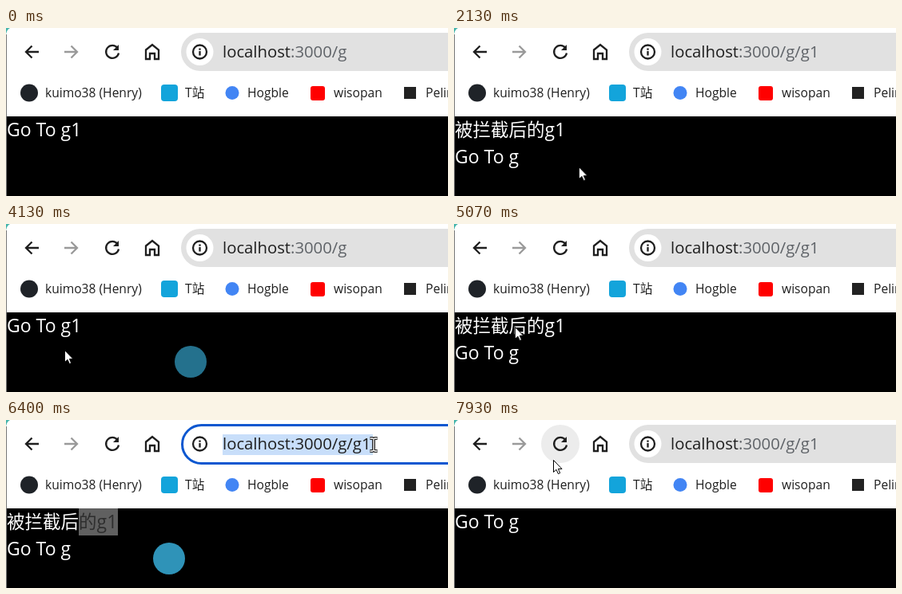
Animation of 553 by 211 pixels, one loop 8 s. Source, as an HTML page:

```html
<!DOCTYPE html>
<html lang="zh">
<head>
<meta charset="utf-8">
<title>Route interception</title>
<style>
html, body { margin: 0; width: 100%; height: 100%; overflow: hidden; background: #fff; }
svg { display: block; width: 553px; height: 211px; }
text { font-family: "Open Sans", "Noto Sans CJK SC", "Noto Sans CJK", sans-serif; white-space: pre; }
.url { font-size: 20.3px; fill: #1f1f1f; }
.marks { font-size: 15.6px; fill: #1f1f1f; }
.page { font-size: 23px; fill: #fff; }
.cjk { font-size: 22.5px; }
.icon { fill: none; stroke: #1f1f1f; stroke-width: 2.3; }

/* hard changes */
.list, .detail, .bare, .sub, .tail, .focus, .rest, .hover, .arrow, .beam, .picked, .sel {
  animation: 8s step-end infinite;
}
.list { animation-name: list; }
.detail { animation-name: detail; }
.bare { animation-name: bare; }
.sub { animation-name: sub, tail; }
.tail { animation-name: tail; }
.focus { animation-name: focus; }
.rest { animation-name: rest; }
.hover { animation-name: hover; }
.arrow { animation-name: arrow; }
.beam { animation-name: beam; }
.picked { animation-name: picked; }
.sel { animation-name: sel, drag; animation-timing-function: step-end, linear;
  transform-box: fill-box; transform-origin: 0 0; }

@keyframes list { 0%, 50.9% { visibility: visible } 18.3%, 62.5%, 100% { visibility: hidden } }
@keyframes detail { 0%, 50.9%, 94.1%, 100% { visibility: hidden } 18.3%, 62.5% { visibility: visible } }
@keyframes bare { 0% { visibility: hidden } 94.1%, 100% { visibility: visible } }
@keyframes sub { 0%, 50.9% { visibility: hidden } 18.3%, 62.5%, 100% { visibility: visible } }
@keyframes tail { 0%, 92.5%, 100% { fill: #5f6368 } 79.1% { fill: #1f1f1f } }
@keyframes focus { 0%, 92.5%, 100% { visibility: hidden } 79.1% { visibility: visible } }
@keyframes rest { 0%, 92.5%, 100% { visibility: visible } 79.1% { visibility: hidden } }
@keyframes hover { 0% { visibility: hidden } 92.5%, 100% { visibility: visible } }
@keyframes beam { 0%, 40%, 69.6%, 88%, 100% { visibility: hidden } 36.6%, 68.4%, 74.4% { visibility: visible } }
@keyframes arrow {
  0%, 36.6%, 68.4%, 74.4% { visibility: hidden }
  6.63%, 40%, 69.6%, 88%, 100% { visibility: visible }
}
@keyframes picked { 0%, 94.1%, 100% { fill: #fff } 79.1% { fill: #2e2e2e } }
@keyframes sel { 0%, 94.1%, 100% { fill: #0336a3 } 79.1% { fill: #606060 } }

/* motion */
@keyframes drag {
  0%, 38.4% { transform: scaleX(0) }
  40%, 50.89% { transform: scaleX(1) }
  50.9%, 68.4% { transform: scaleX(0) }
  69.5%, 94.1% { transform: scaleX(1) }
  94.11%, 100% { transform: scaleX(0) }
}
.cursor { animation: move 8s linear infinite; }
@keyframes move {
  0%, 6.63% { transform: translate(388px, 168px); animation-timing-function: ease-in-out }
  15%, 17.5% { transform: translate(73px, 130px) }
  20%, 23.4% { transform: translate(74px, 121px) }
  26.6% { transform: translate(156px, 174px) }
  29.5% { transform: translate(146px, 185px) }
  33.4%, 34.1% { transform: translate(108px, 184px) }
  36.6%, 38.4% { transform: translate(94px, 124px) }
  41.6%, 44.1% { transform: translate(189px, 126px) }
  51.6% { transform: translate(73px, 158px) }
  54.1%, 55% { transform: translate(72px, 164px) }
  56.6%, 61.6% { transform: translate(68px, 131px) }
  66.6%, 68.4% { transform: translate(90px, 125px) }
  70% { transform: translate(164px, 126px) }
  72.5%, 72.9% { transform: translate(288px, 69px) }
  78.4%, 80.9% { transform: translate(460px, 31px) }
  89.1% { transform: translate(180px, 23px) }
  90%, 92.5% { transform: translate(125px, 25px) }
  99.1%, 100% { transform: translate(124px, 50px) }
}
.pop1 { animation: pop1 8s linear infinite; }
.pop2 { animation: pop2 8s linear infinite; }
@keyframes pop1 {
  0%, 44.1% { transform: translate(231px, 173px) scale(.6); opacity: 0 }
  44.11% { transform: translate(231px, 173px) scale(.6); opacity: 1 }
  46.6% { transform: translate(231px, 173px) scale(1.1) }
  49%, 50.9% { transform: translate(231px, 173px) scale(1); opacity: 1 }
  54.1%, 100% { transform: translate(231px, 173px) scale(1); opacity: 0 }
}
@keyframes pop2 {
  0%, 70% { transform: translate(204px, 174px) scale(.6); opacity: 0 }
  70.01% { transform: translate(204px, 174px) scale(.6); opacity: 1 }
  72.5% { transform: translate(204px, 174px) scale(1.1) }
  75% { transform: translate(204px, 174px) scale(.95) }
  77%, 92.5% { transform: translate(204px, 174px) scale(1); opacity: 1 }
  95.5%, 100% { transform: translate(204px, 174px) scale(1); opacity: 0 }
}
</style>
</head>
<body>
<svg viewBox="0 0 553 211">
  <rect width="553" height="211" fill="#fff"/>
  <path d="M0 0H5Q1 2 0 8Z" fill="#45b5ac"/>

  <!-- toolbar -->
  <circle class="hover" cx="133" cy="30" r="24" fill="#ececec"/>
  <g class="icon">
    <path id="back" d="M41 30H25M32.500 22.500L25 30L32.500 37.500"/>
    <path d="M73 30H89M81.500 22.500L89 30L81.500 37.500" stroke="#9a9a9a"/>
    <path d="M139.500 25A8 8 0 1 0 141 31.500"/>
    <path d="M141 21V28H134Z" fill="#1f1f1f" stroke="none"/>
    <path d="M175 27.500L183 21L191 27.500V39H186V32H180V39H175Z"/>
  </g>

  <!-- address bar -->
  <rect class="rest" x="219" y="6" width="400" height="48" rx="24" fill="#e1e1e1"/>
  <circle class="rest" cx="242.500" cy="30" r="17" fill="#fff"/>
  <g class="focus">
    <rect x="220.500" y="6.500" width="400" height="48" rx="24" fill="#fff" stroke="#0b57d0" stroke-width="3"/>
    <rect x="271" y="18" width="188" height="26" fill="#c8defa"/>
  </g>
  <g class="icon" stroke-width="2">
    <circle cx="242.500" cy="30" r="8.500"/>
    <path d="M242.500 29V34.500M242.500 25.500V27.700"/>
  </g>
  <text class="url" x="271" y="37">localhost<tspan class="tail">:3000/g</tspan><tspan class="sub">/g1</tspan></text>

  <!-- bookmarks -->
  <g class="marks">
    <circle cx="29" cy="81.500" r="11" fill="#1f2328"/>
    <text x="49" y="87">kuimo38 (Henry)</text>
    <rect x="194" y="71" width="21" height="21" rx="4" fill="#13a4db"/>
    <text x="224" y="87">T站</text>
    <circle cx="283" cy="81.500" r="8.500" fill="#4285f4"/>
    <text x="302" y="87">Hogble</text>
    <rect x="381" y="73" width="18" height="18" rx="3" fill="#f00"/>
    <text x="410" y="87">wisopan</text>
    <rect x="498" y="74" width="15" height="15" fill="#222"/>
    <text x="525" y="87">Pelin</text>
  </g>

  <!-- page -->
  <rect y="111" width="553" height="100" fill="#000"/>
  <rect y="8" width="1" height="203" fill="#777"/>
  <rect class="sel" x="91" y="111" width="49" height="34"/>
  <g class="page">
    <text class="list" x="1" y="136">Go To g1</text>
    <g class="detail">
      <text x="1" y="136"><tspan class="cjk">被拦截后</tspan><tspan class="picked"><tspan class="cjk">的</tspan>g1</tspan></text>
      <text x="1" y="170">Go To g</text>
    </g>
    <text class="bare" x="1" y="136">Go To g</text>
  </g>

  <circle class="pop1" r="20" fill="#2f93b8"/>
  <circle class="pop2" r="20" fill="#2f93b8"/>

  <g class="cursor">
    <path class="arrow" d="M.5 .5V15.500L4 12.300L6.400 17.600L8.700 16.600L6.400 11.400H11Z" fill="#fff" stroke="#000"/>
    <g class="beam" fill="none">
      <path id="bar" d="M-4.500 -8H-1.500L0 -7L1.500 -8H4.500M0 -7V7M-4.500 8H-1.500L0 7L1.500 8H4.500" stroke="#222" stroke-width="3.500"/>
      <use href="#bar" style="visibility:inherit"/>
      <path d="M-4.500 -8H-1.500L0 -7L1.500 -8H4.500M0 -7V7M-4.500 8H-1.500L0 7L1.500 8H4.500" stroke="#fff" stroke-width="1.300"/>
    </g>
  </g>
</svg>
</body>
</html>
```
